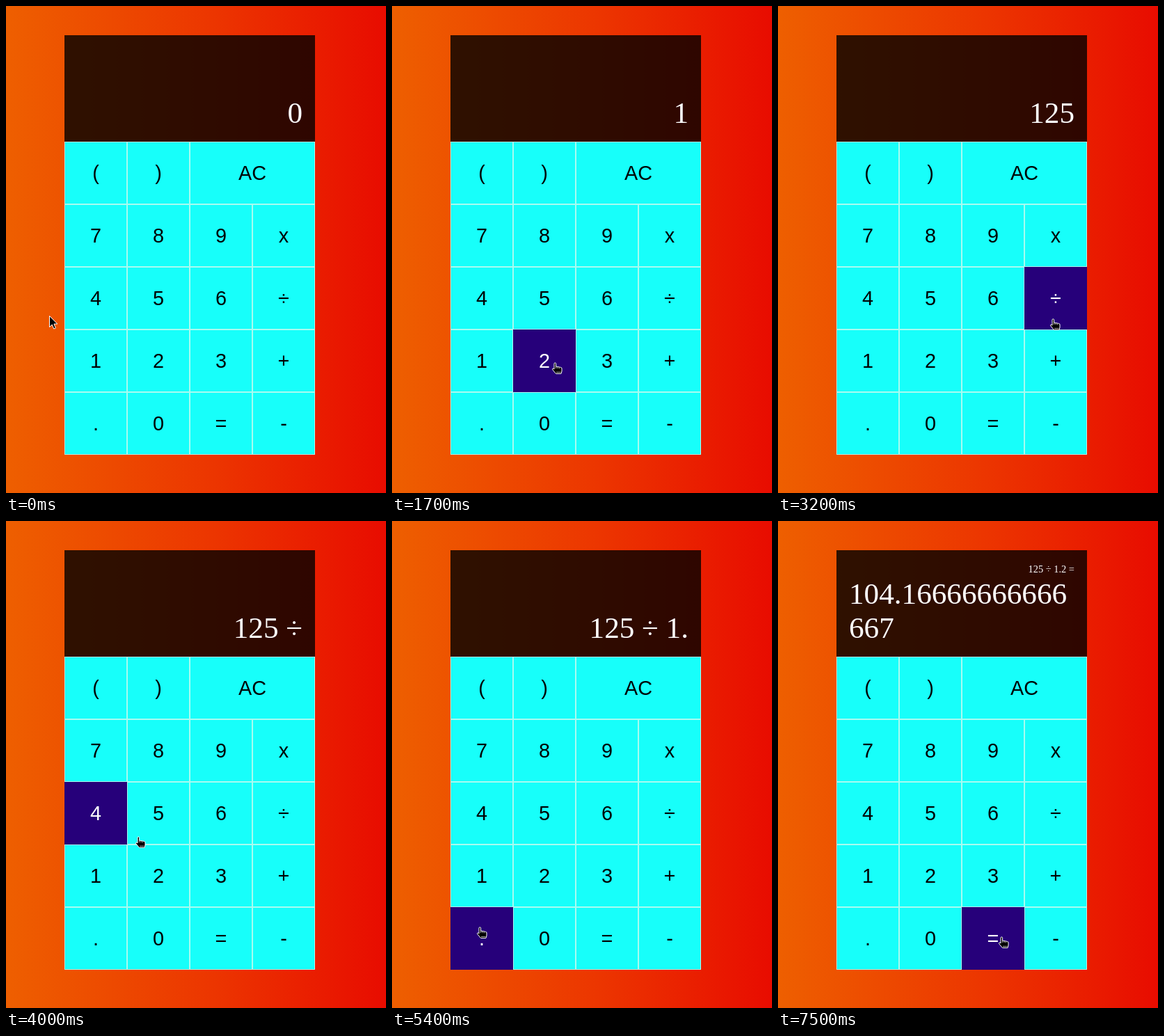
Animation of 546x700 px, one loop 8000 ms. Source, as an HTML page:

```html
<!DOCTYPE html>
<html lang="en">
<head>
<meta charset="utf-8">
<title>Calculator</title>
<style>
  html, body { margin: 0; width: 100%; height: 100%; overflow: hidden; }
  body { position: relative; background: linear-gradient(to right, #ee5f00, #ec3500 55%, #e80c00); }
  #display {
    position: absolute; left: 84px; top: 42px; width: 360px; height: 153px;
    background: rgba(0, 0, 0, .8); color: #fff; font-family: "Liberation Serif", serif;
  }
  #history { position: absolute; right: 18px; top: 18px; font-size: 14.4px; line-height: 18px; }
  #value {
    position: absolute; right: 18px; bottom: 17px; max-width: 324px;
    font-size: 43.2px; line-height: 49px; word-break: break-all;
  }
  #keys {
    position: absolute; left: 84px; top: 195px; width: 360px;
    display: grid; grid-template-columns: repeat(4, 90px); grid-auto-rows: 90px;
  }
  .key {
    box-sizing: border-box; border: 1px solid #a8fbf0; background: #17fffa; color: #000;
    font: 28.8px/88px "Liberation Sans", sans-serif; text-align: center;
  }
  .wide { grid-column: span 2; }
  .hover { background: #26007a; border-color: #26007a; color: #fff; }
  #cursor { position: absolute; left: 0; top: 0; overflow: visible; }
</style>
</head>
<body>
<div id="display"><div id="history"></div><div id="value">0</div></div>
<div id="keys"></div>
<svg id="cursor" width="18" height="22" fill="#000" stroke="#fff" stroke-linejoin="round">
  <path id="arrow" d="M.5 .5V16.5L4.2 13L6.8 19L9.4 17.9L6.9 12H11.8Z"/>
  <g id="hand">
    <path d="M4 10V2.2a1.3 1.3 0 0 1 2.6 0V6.5q1.2-.7 2.3.2 1.4-.5 2.2.4 1.2-.4 2.2.5 1.7-.2 1.7 1.4v4l-1 3.5H6.5L1.5 10.5q-.3-1.7 1.4-1.4z"/>
    <path d="M6.6 6.5V9M9 7V9.2M11.3 7.4V9.4M7 14.4H13.6" stroke-width=".7"/>
  </g>
</svg>
<script>
const LOOP = 8000;
const $ = id => document.getElementById(id);

// time, cursor x, cursor y, hovered key
const moves = [
  [0, 62, 445, ''],
  [700, 92, 467, '1'], [800, 127, 498, '1'], [900, 141, 510, '1'],
  [1600, 185, 511, '2'], [1700, 229, 512, '2'],
  [2300, 235, 420, '5'],
  [2900, 262, 424, '6'], [3000, 310, 432, '6'], [3100, 360, 442, '÷'], [3200, 390, 449, '÷'],
  [3900, 320, 452, '6'], [4000, 185, 453, '4'], [4100, 140, 466, '1'],
  [4200, 128, 490, '1'], [4300, 124, 505, '1'],
  [4900, 123, 530, '1'], [5000, 122, 560, '.'], [5100, 121, 583, '.'],
  [5600, 140, 566, '1'], [5700, 185, 528, '2'], [5800, 215, 507, '2'],
  [6400, 257, 534, '2'],
  [6600, 275, 556, '='], [6700, 300, 582, '='], [6800, 316, 597, '=']
];

// time, value, history line
const entries = [
  [0, '0'], [1300, '1'], [2200, '12'], [2700, '125'], [3600, '125 ÷'],
  [4700, '125 ÷ 1'], [5400, '125 ÷ 1.'], [6100, '125 ÷ 1.2'],
  [7500, '104.16666666666667', '125 ÷ 1.2 =']
];

const keys = '( ) AC 7 8 9 x 4 5 6 ÷ 1 2 3 + . 0 = -'.split(' ').map(label => {
  const key = document.createElement('div');
  key.className = label === 'AC' ? 'key wide' : 'key';
  key.textContent = label;
  return $('keys').appendChild(key);
});

const latest = (steps, t) => steps.filter(step => step[0] <= t).pop();

function draw(t) {
  const [, x, y, hovered] = latest(moves, t);
  const [, value, history = ''] = latest(entries, t);
  $('value').textContent = value;
  $('history').textContent = history;
  keys.forEach(key => key.classList.toggle('hover', key.textContent === hovered));
  $('cursor').style.transform = `translate(${x}px, ${y}px)`;
  $('arrow').style.display = hovered ? 'none' : '';
  $('hand').style.display = hovered ? '' : 'none';
}

const start = performance.now();
function tick() {
  draw((performance.now() - start) % LOOP);
  requestAnimationFrame(tick);
}
tick();
</script>
</body>
</html>
```
